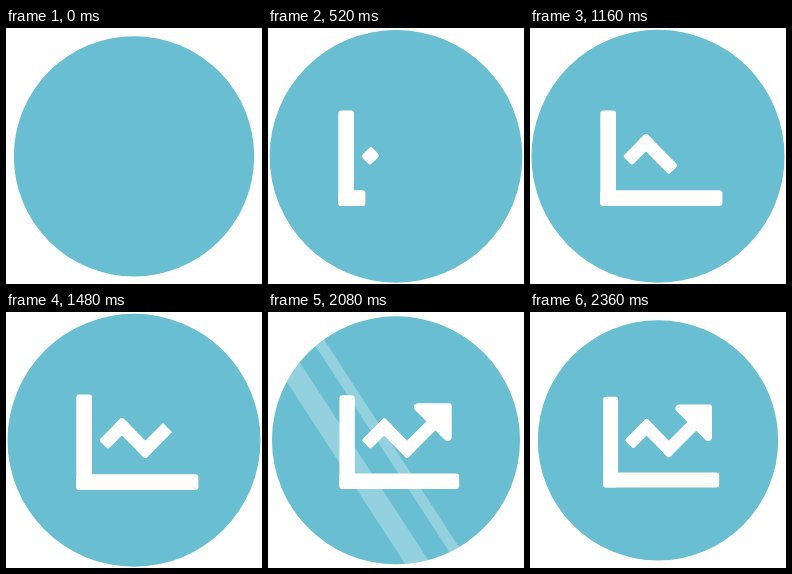
Recreate the animation shown at these times as an HTML page with a canvas. Size 256 by 256 pixels, loop 3.8 s.

```html
<!DOCTYPE html>
<html lang="en">
<head>
<meta charset="utf-8">
<title>Growth chart icon</title>
<style>
  html, body { margin: 0; width: 100%; height: 100%; overflow: hidden; background: #fff; }
  canvas { display: block; width: 100vw; height: 100vh; }
</style>
</head>
<body>
<canvas id="stage" width="256" height="256"></canvas>
<script>
const ctx = document.getElementById('stage').getContext('2d');
const LOOP = 3800, STEP = 40;
const CENTER = { x: 128, y: 128.3 }, RADIUS = 126.5;
const TEAL = '#69bfd1', LINE = 13;
const START = [102, 128.2], PEAK = [116, 114.2], VALLEY = [139.3, 137.8], NECK = [166, 111.1];

const clamp = (v, lo, hi) => Math.min(hi, Math.max(lo, v));
const progress = (t, from, to) => clamp((t - from) / (to - from), 0, 1);
const distance = (a, b) => Math.hypot(b[0] - a[0], b[1] - a[1]);

// cubic-bezier(.25, .1, .25, 1), solved for x by bisection
function ease(x) {
  const curve = (u, a, b) => 3 * u * (1 - u) ** 2 * a + 3 * u * u * (1 - u) * b + u ** 3;
  let lo = 0, hi = 1;
  for (let i = 0; i < 20; i++) {
    const mid = (lo + hi) / 2;
    if (curve(mid, .25, .25) < x) lo = mid; else hi = mid;
  }
  return curve(lo, .1, 1);
}

function box(x, y, w, h, r) {
  if (w <= 0 || h <= 0) return;
  ctx.beginPath();
  ctx.roundRect(x, y, w, h, Math.min(r, w / 2, h / 2));
  ctx.fill();
}

// Bar with square ends reaching half a line width past both points
function bar(a, b, drawn) {
  ctx.save();
  ctx.translate(...a);
  ctx.rotate(Math.atan2(b[1] - a[1], b[0] - a[0]));
  box(-LINE / 2, -LINE / 2, LINE + Math.min(drawn, distance(a, b)), LINE, 2.5);
  ctx.restore();
}

function drawAxes(t) {
  const drawn = Math.max(0, (t - 145) * .285);
  box(70.3, 82.4, 15.7, Math.min(drawn, 95.5), 3);
  if (drawn > 95.5) box(70.3, 162.2, Math.min(drawn - 79.8, 122.1), 15.7, 3);
}

function drawArrow(drawn) {
  const cut = VALLEY[0] - VALLEY[1] + (drawn + LINE / 2) * Math.SQRT2;
  ctx.save();
  ctx.beginPath();
  ctx.moveTo(cut - 100, -100);
  ctx.lineTo(cut + 300, 300);
  ctx.lineTo(-400, 300);
  ctx.lineTo(-400, -100);
  ctx.clip();
  bar(VALLEY, NECK, Infinity);
  const top = 90.6, right = 184.8, slant = 50;
  ctx.beginPath();
  ctx.moveTo(165, top);
  ctx.arcTo(right, top, right, 110, 2.5);
  ctx.arcTo(right, right - slant, 160, 160 - slant, 4);
  ctx.arcTo(top + slant, top, 165, top, 4);
  ctx.fill();
  ctx.restore();
}

function drawTrend(t) {
  const first = distance(START, PEAK), second = distance(PEAK, VALLEY);
  const drawn = (t - 506) * .08;
  bar(START, PEAK, drawn);
  if (drawn > first) bar(PEAK, VALLEY, drawn - first);
  if (drawn > first + second) drawArrow(drawn - first - second);
}

function drawShine(t) {
  const p = progress(t, 1900, 2360);
  if (p === 0 || p === 1) return;
  const shift = -88 + 366 * p, lean = 128 * .65;
  ctx.save();
  ctx.clip();
  ctx.fillStyle = 'rgba(255,255,255,.28)';
  for (const [x, w] of [[0, 26], [53, 13]]) {
    const left = x + shift;
    ctx.beginPath();
    ctx.moveTo(left - lean, 0);
    ctx.lineTo(left - lean + w, 0);
    ctx.lineTo(left + lean + w, 256);
    ctx.lineTo(left + lean, 256);
    ctx.fill();
  }
  ctx.restore();
}

function draw(t) {
  const shrink = 1 - .05 * progress(t, 1900, 2360);
  const grow = .95 + .05 * ease(progress(t, 120, 620));
  ctx.clearRect(0, 0, 256, 256);
  ctx.save();
  ctx.translate(CENTER.x, CENTER.y);
  ctx.scale(shrink, shrink);
  ctx.translate(-CENTER.x, -CENTER.y);
  ctx.fillStyle = TEAL;
  ctx.beginPath();
  ctx.arc(CENTER.x, CENTER.y, RADIUS * (t < 160 ? .95 : grow), 0, 2 * Math.PI);
  ctx.fill();
  drawShine(t);
  ctx.fillStyle = '#fff';
  drawAxes(t);
  drawTrend(t);
  ctx.restore();
}

function tick() {
  const t = performance.now() % LOOP;
  draw(Math.floor(t / STEP) * STEP);
  requestAnimationFrame(tick);
}
tick();
</script>
</body>
</html>
```
